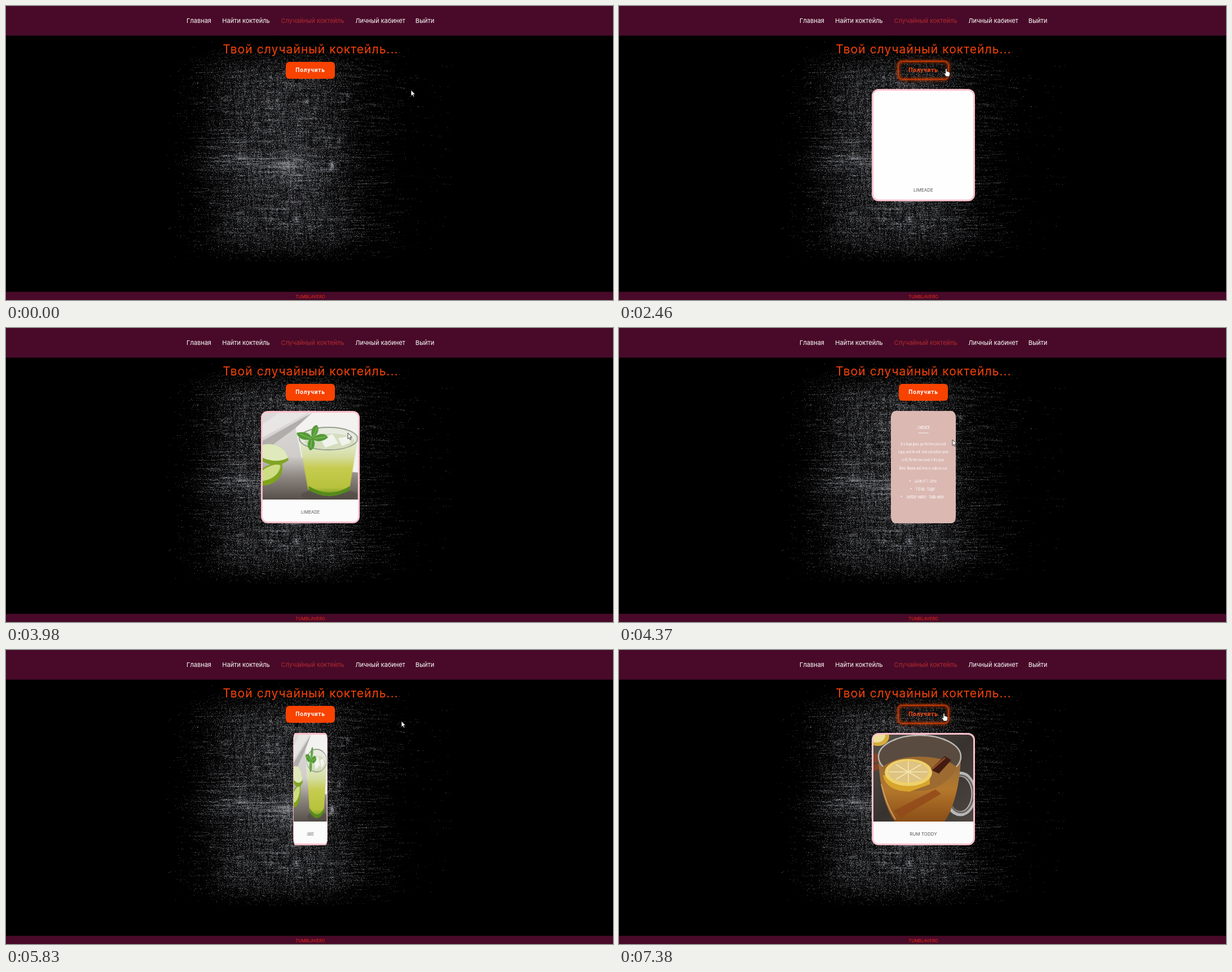
An HTML page with a canvas that plays this animation: 1076 by 521 pixels, repeating every 8000 ms.

```html
<!DOCTYPE html>
<html lang="ru">
<head>
<meta charset="utf-8">
<title>Случайный коктейль</title>
<style>
  html, body { margin: 0; width: 100%; height: 100%; overflow: hidden; background: #000; }
  body { position: relative; font-family: Inter, "Open Sans", sans-serif; }
  canvas, .page, .btn, .card, .face, .face svg, .cursor { position: absolute; }
  canvas, .page { left: 0; top: 0; }
  text { text-anchor: middle; }
  .nav { font-size: 11px; fill: #fff; }
  .nav .active { fill: #b22a30; }
  .title { font-size: 21px; letter-spacing: 1.05px; fill: #f64208; }
  .foot { font-size: 7.7px; fill: #ee2a12; }

  .btn, .card, .face, .photo, .name, .cursor, .arrow, .hand {
    animation: 8s linear infinite;
  }
  .btn {
    left: 496px; top: 99px; width: 87px; height: 30px; border-radius: 6px;
    font: 700 10px/30px Roboto, "Open Sans", sans-serif;
    letter-spacing: .9px; text-align: center;
    animation-name: hover;
  }
  @keyframes hover {
    0%, 12%, 34.125%, 80.625% {
      background: #f74200; color: #fff;
      box-shadow: 0 0 0 0 #e0400000, 0 0 0 0 #a02c0000, inset 0 0 0 0 #c83a0500;
    }
    14.875%, 31.375%, 82.875%, 100% {
      background: #0000; color: #ff4408;
      box-shadow: 0 0 3px 2px #d84004, 0 0 8px 1px #a02c00, inset 0 0 5px 1px #a83205;
    }
  }

  .card { left: 448px; top: 147px; width: 183px; height: 199px; animation-name: appear; animation-timing-function: step-end; }
  @keyframes appear { 0% { opacity: 0 } 30.75%, 100% { opacity: 1 } }
  .face {
    --side: 0deg;
    inset: 0; box-sizing: border-box; border-radius: 12px; overflow: hidden;
    backface-visibility: hidden; animation-name: flip;
  }
  .front { border: 3px solid #ffc0cb; background: #fefefe; }
  .back { --side: 180deg; background: #dbb8b2; }
  .face svg { left: 0; top: 0; }
  @keyframes flip {
    0%, 49.025%, 75.96%, 100% { transform: rotateY(var(--side)); }
    56.86%, 68.125% { transform: rotateY(calc(var(--side) + 180deg)); }
  }
  .photo, .name, .arrow, .hand { animation-timing-function: step-end; }
  .name { font-size: 8px; fill: #555; }
  .photo.lime { animation-name: limePhoto; }
  .photo.rum { animation-name: rumPhoto; }
  .name.lime { animation-name: limeName; }
  .name.rum { animation-name: rumName; }
  @keyframes limePhoto { 0% { opacity: 0 } 36.25% { opacity: 1 } 92.25%, 100% { opacity: 0 } }
  @keyframes rumPhoto { 0% { opacity: 0 } 92.25%, 100% { opacity: 1 } }
  @keyframes limeName { 0% { opacity: 1 } 89.5%, 100% { opacity: 0 } }
  @keyframes rumName { 0% { opacity: 0 } 89.5%, 100% { opacity: 1 } }
  .back text { fill: #fff; }
  .steps { font-size: 7.1px; }
  .items { font-size: 8.2px; }

  .cursor { left: 0; top: 0; overflow: visible; animation-name: move; }
  .cursor path { fill: #fff; stroke: #111; stroke-width: .8; }
  .arrow { animation-name: arrow; }
  .hand { animation-name: hand; }
  @keyframes arrow { 0% { opacity: 1 } 12% { opacity: 0 } 31.375% { opacity: 1 } 80.625%, 100% { opacity: 0 } }
  @keyframes hand { 0% { opacity: 0 } 12% { opacity: 1 } 31.375% { opacity: 0 } 80.625%, 100% { opacity: 1 } }
  @keyframes move {
    0% { transform: translate(718px, 149px) }
    3.5% { transform: translate(718px, 149px); animation-timing-function: ease-in }
    12% { transform: translate(583px, 116px); animation-timing-function: ease-out }
    13.4% { transform: translate(580px, 111px) }
    30.75% { transform: translate(580px, 111px); animation-timing-function: ease-in-out }
    37.1% { transform: translate(719px, 145px) }
    46% { transform: translate(719px, 145px); animation-timing-function: ease-in }
    49.025% { transform: translate(630px, 178px) }
    49.75% { transform: translate(606px, 186px); animation-timing-function: ease-out }
    54.6% { transform: translate(591px, 198px) }
    55.75%, 66.1% { transform: translate(595px, 196px) }
    68.125% { transform: translate(631px, 170px); animation-timing-function: ease-out }
    72.8%, 76.5% { transform: translate(701px, 126px) }
    80.625% { transform: translate(583px, 121px); animation-timing-function: ease-out }
    82.875%, 100% { transform: translate(576px, 112px) }
  }
</style>
</head>
<body>
<canvas width="1076" height="521"></canvas>

<svg class="page" width="1076" height="521">
  <path d="M0 0H1076V52.4H0ZM0 506.6H1076V521H0Z" fill="#480a28"/>
  <g class="nav">
    <text x="342" y="30">Главная</text>
    <text x="425.5" y="30">Найти коктейль</text>
    <text x="543.5" y="30" class="active">Случайный коктейль</text>
    <text x="663.5" y="30">Личный кабинет</text>
    <text x="742.5" y="30">Выйти</text>
  </g>
  <text class="title" x="540" y="84">Твой случайный коктейль...</text>
  <text class="foot" x="539.5" y="517.5">TUMBLAVERO</text>
</svg>

<div class="btn">Получить</div>

<div class="card">
  <div class="face front">
    <svg width="177" height="193">
      <defs>
        <linearGradient id="table" x2="0" y2="1">
          <stop offset="0" stop-color="#dddbd9"/><stop offset=".5" stop-color="#d0cdca"/>
          <stop offset=".75" stop-color="#8a837e"/><stop offset="1" stop-color="#574f4a"/>
        </linearGradient>
        <linearGradient id="juice" x2="0" y2="1">
          <stop offset="0" stop-color="#e9eedd"/><stop offset=".3" stop-color="#d5dda0"/>
          <stop offset=".5" stop-color="#c6cc50"/><stop offset=".85" stop-color="#b8c23c"/>
          <stop offset="1" stop-color="#64901c"/>
        </linearGradient>
        <linearGradient id="slate" x2="1" y2="1">
          <stop offset="0" stop-color="#57504a"/><stop offset=".5" stop-color="#38322f"/>
          <stop offset="1" stop-color="#4d4641"/>
        </linearGradient>
        <linearGradient id="tea" x2="0" y2="1">
          <stop offset="0" stop-color="#8f6a42"/><stop offset=".5" stop-color="#b4782c"/>
          <stop offset="1" stop-color="#8a4d16"/>
        </linearGradient>
        <clipPath id="frame"><path d="M0 0H177V154H0Z"/></clipPath>
      </defs>

      <g class="photo lime">
        <path d="M0 0H177V193H0Z" fill="#fbfbfb"/>
        <g clip-path="url(#frame)">
          <path d="M0 0H177V154H0Z" fill="url(#table)"/>
          <path d="M88 0H177V106L150 104 72 80 60 22Z" fill="#f3f2f1"/>
          <path d="M0 50L92 0 60 28 0 70Z" fill="#b0adab"/>
          <path d="M0 44L84 0H30L0 20Z" fill="#e7e6e5"/>
          <path d="M0 58C22 52 42 62 48 84C34 96 12 94 0 86Z" fill="#81a526"/>
          <path d="M0 57C22 52 42 62 47 80C32 88 14 86 0 80Z" fill="#dfe9bb"/>
          <path d="M0 99Q22 86 36 91C40 112 22 130 0 129Z" fill="#7fa41c"/>
          <path d="M0 102Q20 89 33 93C33 107 18 119 0 121Z" fill="#cedd84"/>
          <ellipse cx="124" cy="146" rx="52" ry="11" fill="#4f4a40" opacity=".55"/>
          <path d="M68 48L84 136Q124 160 161 136L176 48Z" fill="url(#juice)"/>
          <path d="M85 130Q124 153 162 130L161 138Q124 157 86 138Z" fill="#568a1c"/>
          <ellipse cx="122" cy="46" rx="54" ry="20" fill="#e6eadf" stroke="#96a18a" stroke-width="2"/>
          <ellipse cx="124" cy="51" rx="46" ry="14" fill="#d4ddbd"/>
          <path d="M106 45L130 38 140 54 116 62ZM140 45L160 42 163 53 147 59Z" fill="#f1f4ec"/>
          <path d="M86 48C72 50 64 42 63 36C76 32 88 36 91 44C88 30 94 22 101 22C106 30 102 38 96 43C108 34 118 38 121 44C112 52 100 52 95 48C99 58 94 66 88 67C82 60 83 54 86 48Z" fill="#549b37"/>
          <path d="M90 46L70 38M93 45L100 27M96 46L116 43M91 48L89 62" stroke="#9dca72" fill="none"/>
        </g>
      </g>

      <g class="photo rum">
        <path d="M0 0H177V193H0Z" fill="#fbfbfb"/>
        <g clip-path="url(#frame)">
          <path d="M0 0H177V154H0Z" fill="url(#slate)"/>
          <ellipse cx="8" cy="3" rx="20" ry="17" fill="#d8ac3c"/>
          <ellipse cx="6" cy="1" rx="15" ry="13" fill="#eddf9c"/>
          <path d="M0 34L70 26 78 36 0 50ZM0 54L30 42 30 54 0 65Z" fill="#834429"/>
          <ellipse cx="154" cy="105" rx="24" ry="35" fill="none" stroke="#b6b7b8" stroke-width="9"/>
          <ellipse cx="155" cy="105" rx="22" ry="33" fill="none" stroke="#6c655f" stroke-width="3"/>
          <path d="M9 40C10 92 22 132 38 154H126C143 130 154 84 155 40Z" fill="url(#tea)"/>
          <ellipse cx="82" cy="39" rx="73" ry="38" fill="#594b40" stroke="#b9b7b2" stroke-width="2.5"/>
          <path d="M15 58Q40 38 85 39T149 59Q122 100 80 100T15 58Z" fill="#9d6a31"/>
          <path d="M101 62L126 38 138 45 116 69Z" fill="#431b10"/>
          <path d="M103 62L127 41" stroke="#8d4a29" stroke-width="3"/>
          <path d="M17 72Q22 100 64 101L100 88V72Z" fill="#d7a52c"/>
          <ellipse cx="62" cy="67" rx="42" ry="24" fill="#eed16b"/>
          <ellipse cx="62" cy="66" rx="36" ry="19" fill="#dfc382"/>
          <path d="M28 66H96M40 53L84 79M62 47V85M84 53L40 79" stroke="#f5e8b4" stroke-width="1.5"/>
          <path d="M36 135L110 97 120 105 48 147Z" fill="#91481a" opacity=".8"/>
          <path d="M14 88Q23 125 39 150" stroke="#d0a069" stroke-width="2" fill="none"/>
        </g>
      </g>

      <text class="name lime" x="88.5" y="179">LIMEADE</text>
      <text class="name rum" x="88.5" y="179">RUM TODDY</text>
    </svg>
  </div>

  <div class="face back">
    <svg width="183" height="199">
      <text x="91.5" y="31.5" font-size="8.2">LIMEADE</text>
      <path d="M77 39H106" stroke="#fff" stroke-width=".8"/>
      <g class="steps">
        <text x="91.5" y="61">In a large glass, put the lime juice and</text>
        <text x="91.5" y="75.2">sugar, and stir well. Add cold seltzer water</text>
        <text x="91.5" y="89.4">to fill. Put the lime peels in the glass.</text>
        <text x="91.5" y="103.6">Drink. Repeat until limes or soda run out.</text>
      </g>
      <g class="items">
        <text x="97.5" y="127">Juice of 1 : Lime</text>
        <text x="97.5" y="140.8">1 tblsp : Sugar</text>
        <text x="97.5" y="154.5">(seltzer water) : Soda water</text>
      </g>
      <g fill="#fff">
        <circle cx="54" cy="124" r="1.3"/><circle cx="56.5" cy="137.8" r="1.3"/><circle cx="29.5" cy="151.2" r="1.3"/>
      </g>
    </svg>
  </div>
</div>

<svg class="cursor" width="1" height="1">
  <path class="arrow" d="M0 0V10.5L2.4 8.3 4 12 5.7 11.2 4.1 7.7H7.3Z"/>
  <path class="hand" d="M-1.2 1.2Q-1.2 0 0 0T1.2 1.2V5Q2.6 4.5 3.1 5.5 4.6 5 5 6.2 6.6 6 6.6 7.6V10Q6.2 12 5.3 14H-.5Q-1.5 11.5-4 8.5-3.5 6.8-1.2 8.6Z"/>
</svg>

<script>
  // Chalk texture: seeded grain, bent horizontal strokes and a vertical weave.
  const ctx = document.querySelector('canvas').getContext('2d');
  const LEFT = 285, TOP = 53, W = 510, H = 400;
  const spots = [[577, 282, 4, .9], [533, 170, 3, .6], [590, 238, 3, .5], [514, 377, 3, .6], [606, 160, 3, .4], [505, 285, 26, .2]];

  function hash(x, y) {
    let n = Math.imul(x, 374761393) + Math.imul(y, 668265263) | 0;
    n = Math.imul(n ^ (n >>> 13), 1274126177);
    return ((n ^ (n >>> 16)) >>> 0) / 2 ** 32;
  }
  function noise(x, y) {
    const i = Math.floor(x), j = Math.floor(y), u = x - i, v = y - j;
    const mix = (a, b, t) => a + (b - a) * t;
    return mix(mix(hash(i, j), hash(i + 1, j), u), mix(hash(i, j + 1), hash(i + 1, j + 1), u), v);
  }
  const bump = (v, mid, size, power) => Math.exp(-(((v - mid) / size) ** power));

  function density(x, y) {
    const bend = (x - 505) ** 2 / 3500 * (1 - (y - 60) / 210);
    const stroke = noise(x / 26, (y - bend) / 1.3);
    const weave = noise(x / 2, y / 14);
    const band = bump(y, 280 + (x - 450) * .06, 18, 2) * bump(x, 450, 110, 4);
    let d = bump(y, 262, 172, 10) * (
      bump(x, 490, 115, 4) * .3 * (.4 + weave) +
      bump(x, 510, 172, 6) * .4 * stroke ** 3 +
      bump(x, 540, 240, 10) * .18 * stroke ** 9 +
      band * .4 * stroke);
    for (const [sx, sy, r, a] of spots) d += a * Math.exp(-((x - sx) ** 2 + (y - sy) ** 2 / 3) / (r * r));
    return d;
  }

  const img = ctx.createImageData(W, H);
  for (let y = 0; y < H; y++) {
    for (let x = 0; x < W; x++) {
      const d = Math.min(1, density(x + LEFT, y + TOP));
      const lit = hash(x + 1000, y + 2000) < d;
      const g = lit ? 25 + 65 * hash(x + 5000, y + 9000) + 70 * d : d * 55;
      img.data.set([g * .97, g * .98, g * 1.03, 255], (y * W + x) * 4);
    }
  }
  ctx.putImageData(img, LEFT, TOP);
</script>
</body>
</html>
```
